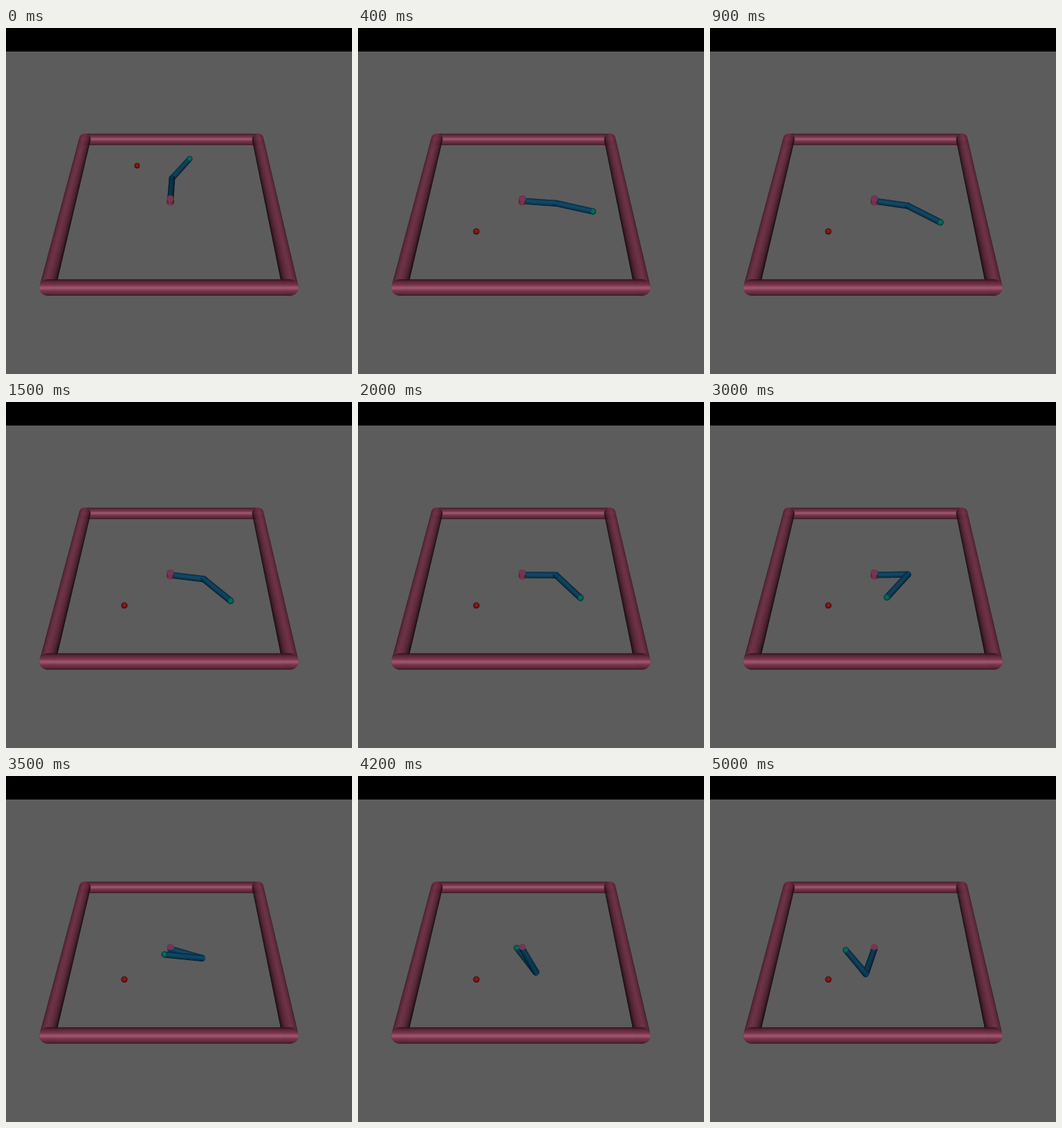
An HTML page with a canvas that plays this animation: 500x500 px, repeating every 5.1 s.

```html
<!DOCTYPE html>
<html lang="en">
<head>
<meta charset="utf-8">
<title>Two-link arm</title>
<style>
  html, body { margin: 0; width: 100%; height: 100%; overflow: hidden; background: #000; }
  canvas { display: block; width: 500px; height: 500px; }
</style>
</head>
<body>
<canvas id="stage" width="500" height="500"></canvas>
<script>
const ctx = document.getElementById("stage").getContext("2d");
const STEP = 100, STEPS = 51;
const RAD = Math.PI / 180;
const ROSE = [124, 52, 76], BLUE = [9, 62, 92];

// Perspective view of the floor; the walls lie at -1 and 1.
function project(x, y, size) {
  const depth = 1 + 0.168 * y;
  return {
    x: (237.5 + 146 * x + 41.6 * y) / depth,
    y: (250 - 62 * y) / depth,
    r: size / depth
  };
}

function ball(p, light, dark) {
  const g = ctx.createRadialGradient(p.x, p.y - p.r * 0.2, 0, p.x, p.y, p.r);
  g.addColorStop(0, light);
  g.addColorStop(0.45, light);
  g.addColorStop(1, dark);
  ctx.fillStyle = g;
  ctx.beginPath();
  ctx.arc(p.x, p.y, p.r, 0, Math.PI * 2);
  ctx.fill();
}

// Round-ended tapered rod, lit across its width; peak (-1 to 1) is the brightest line.
function rod(a, b, color, peak, gloss) {
  const len = Math.hypot(b.x - a.x, b.y - a.y) || 1;
  const ux = (b.x - a.x) / len, uy = (b.y - a.y) / len;
  const n = Math.ceil(3 * Math.max(a.r, b.r));
  const corner = (p, s, dir) => {
    const along = dir * p.r * Math.sqrt(1 - s * s), across = p.r * s;
    ctx.lineTo(p.x + ux * along + uy * across, p.y + uy * along - ux * across);
  };
  for (let i = 0; i < n; i++) {
    const s = -1 + 2 * i / n, end = Math.min(1, s + 3 / n), mid = s + 1 / n;
    const lit = Math.max(0, Math.cos(Math.asin(mid) - Math.asin(peak)));
    const rgb = color.map(c => Math.round(c * (0.2 + 0.8 * lit) + gloss * lit ** 30));
    ctx.fillStyle = `rgb(${rgb})`;
    ctx.beginPath();
    corner(a, s, -1);
    corner(b, s, 1);
    corner(b, end, 1);
    corner(a, end, -1);
    ctx.fill();
  }
}

function walls() {
  const [tl, tr, bl, br] = [[-1, 1], [1, 1], [-1, -1], [1, -1]].map(([x, y]) => project(x, y, 9.7));
  const side = ROSE.map(c => c * 0.86);
  rod(tl, tr, ROSE, 0.05, 34);
  rod(bl, tl, side, 0.3, 4);
  rod(tr, br, side, 0.3, 4);
  rod(bl, br, ROSE, -0.05, 34);
}

// Links pointing toward or away from the viewer catch less light.
function link(a, b) {
  const [from, to] = a.x < b.x ? [a, b] : [b, a];
  const level = 0.75 + 0.35 * (to.x - from.x) / (Math.hypot(to.x - from.x, to.y - from.y) || 1);
  rod(from, to, BLUE.map(c => c * level), 0.15, 5);
}

function post(showBody) {
  if (showBody) {
    rod({ x: 237.5, y: 247, r: 5.2 }, { x: 237.5, y: 251.5, r: 5.2 }, ROSE, -0.1, 4);
  }
  ctx.fillStyle = "#743650";
  ctx.beginPath();
  ctx.ellipse(237.5, 247, 5.2, 4.4, 0, 0, Math.PI * 2);
  ctx.fill();
}

function arm(shoulder, elbow) {
  const a = shoulder * RAD, b = (shoulder + elbow) * RAD;
  const ex = Math.cos(a) / 3, ey = Math.sin(a) / 3;
  const tx = ex + 0.37 * Math.cos(b), ty = ey + 0.37 * Math.sin(b);
  const base = project(0, 0, 4.6), joint = project(ex, ey, 4.6), tip = project(tx, ty, 4.4);
  const forearm = () => {
    link(joint, tip);
    ball(tip, "#0a6a5a", "#043a3c");
  };
  if (ty > 0) forearm();
  link(base, joint);
  post(Math.sin(a) > -0.35);
  if (ty <= 0) forearm();
}

// Smooth swing by an angle, beginning at a step and lasting some steps.
function swing(t, begin, steps, angle) {
  const u = Math.min(1, Math.max(0, (t - begin) / steps));
  return angle * (1 - Math.cos(Math.PI * u)) / 2;
}

function shoulderAt(t) {
  return -3.5 + swing(t, 1, 9, -8) + swing(t, 12, 15, 20.3) + swing(t, 25.5, 27.5, -115.5);
}

// Folds steadily, then fast, until the joint stop throws it back.
function elbowAt(t) {
  const fold = -4 - 2.6 * (t - 1) + swing(t, 19, 20, -81) + swing(t, 37, 20, 109);
  return Math.max(-173, fold);
}

function draw(step) {
  ctx.fillStyle = "#000";
  ctx.fillRect(0, 0, 500, 34);
  ctx.fillStyle = "#5c5c5c";
  ctx.fillRect(0, 34, 500, 466);
  walls();
  // The first step shows the end of an earlier run.
  const earlier = step === 0;
  const goal = earlier ? { x: 189.5, y: 199, r: 3.9 } : { x: 171, y: 294, r: 4.6 };
  ball(goal, "#8c1a12", "#340806");
  if (earlier) arm(87.6, -28.6);
  else arm(shoulderAt(step), elbowAt(step));
}

const start = performance.now();
function tick() {
  draw(Math.floor((performance.now() - start) / STEP) % STEPS);
  requestAnimationFrame(tick);
}
tick();
</script>
</body>
</html>
```
